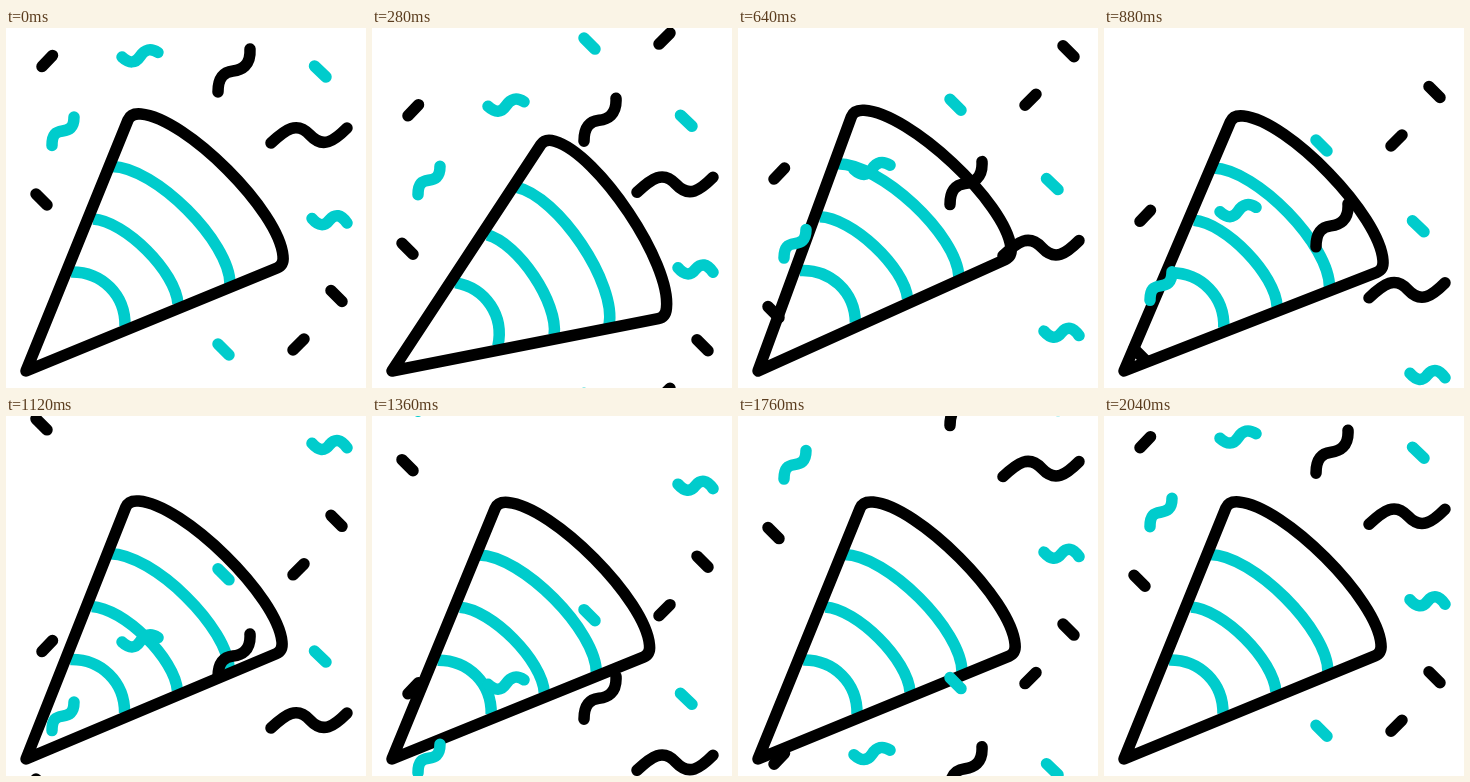
Write an HTML page that moves like this. It is 360 px wide and 360 px high and loops after 2.08 s.

```html
<!DOCTYPE html>
<html lang="en">
<head>
<meta charset="utf-8">
<title>Party popper</title>
<style>
  html, body { margin: 0; width: 100%; height: 100%; overflow: hidden; background: #fff; }
  svg { display: block; width: 100vw; height: 100vh; }
  path { fill: none; stroke: #000; stroke-width: 11.5; stroke-linecap: round; stroke-linejoin: round; }
  .teal { stroke: #00cccc; }
  .arc { stroke-linecap: butt; }
</style>
</head>
<body>
<svg viewBox="0 0 360 360">
  <g id="cone">
    <path class="teal arc" d="M106 138.500C149 139 224 214 224 256
      M87 191C119 193 170 244 172 276
      M65 244C96 243.500 119.500 267 119 298"/>
    <path d="M20 343L122 92Q125 85 135 86C180 90 273 183 277 228Q278 237 271 240Z"/>
  </g>
  <g id="falling">
    <g id="confetti">
      <path d="M36 38.500L46.500 27.500M30 166L41 177M325 262.500L336 273.500M287 322L298 311
        M212 64C212 48 219 44 227 43S245 38 244 21
        M265 115C280 101 291 93 304 107S328 113 341 100"/>
      <path class="teal" d="M308.500 38L320 49M212 316L223 327
        M116 29Q127 39 134 28.500Q141 17.500 152 24.500
        M306 190.500Q316 202 323.500 192Q332 182 341 195
        M46 117.500C46 106 50 104 56.500 103S68 100 68 89"/>
    </g>
  </g>
  <use id="next" href="#confetti"/>
</svg>
<script>
  const LOOP = 2080, STEP = 40;
  const SWING = 480;      // first lean, then a damped wobble
  const FALL = 366, DROP_IN = 353.5;
  const el = id => document.getElementById(id);
  const cone = el('cone'), falling = el('falling'), next = el('next');

  function lean(t) {
    if (t < SWING) return 11.6 * Math.sin(Math.PI * t / SWING);
    const s = (t - SWING) / 1000;
    return -3.5 * Math.exp(-3 * s) * Math.sin(4 * Math.PI * s);
  }

  function draw(t) {
    const p = t / LOOP;
    cone.setAttribute('transform', `rotate(${lean(t)} 20 343)`);
    falling.setAttribute('transform', `translate(0 ${FALL * p})`);
    next.setAttribute('transform', `translate(0 ${DROP_IN * (p - 1)})`);
  }

  const start = performance.now();
  function tick() {
    const t = (performance.now() - start) % LOOP;
    draw(Math.floor(t / STEP) * STEP);
    requestAnimationFrame(tick);
  }
  draw(0);
  requestAnimationFrame(tick);
</script>
</body>
</html>
```
